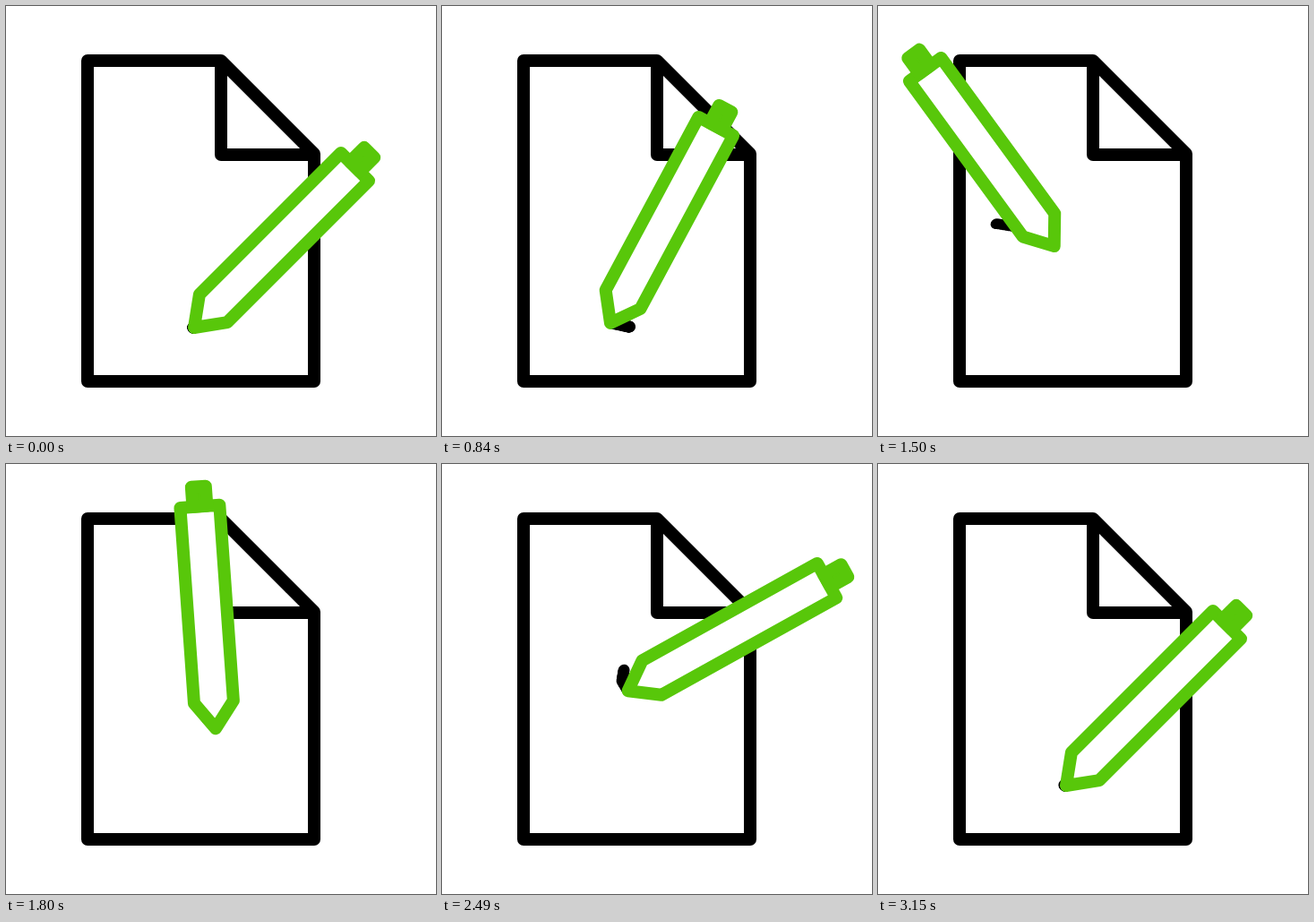
Recreate the animation shown at these times as an HTML page without scripts. Size 480 px wide and 480 px high, loop 3.18 s.

```html
<!DOCTYPE html>
<html lang="en">
<head>
<meta charset="utf-8">
<title>Writing pen</title>
<style>
  html, body { margin: 0; width: 100%; height: 100%; overflow: hidden; background: #fff; }
  svg { display: block; width: 100vw; height: 100vh; }
  path { stroke-width: 14; stroke-linecap: round; stroke-linejoin: round; }
  .page { fill: none; stroke: #000; }
  .pen path { fill: #fff; stroke: #58c70a; vector-effect: non-scaling-stroke; }
  .pen .cap { fill: #58c70a; }

  /* The ink is a chain of dots that follow the nib with growing delay. */
  .pen, .ink circle { animation: write 3180ms linear infinite; }
  .ink circle { r: 6.4px; animation-delay: calc(var(--i) * 9ms - 3180ms); }

  @keyframes write {
    0%, 18.87% { translate: 210px 359px; rotate: 45deg; scale: 1 1; }
    19.81% { translate: 211.5px 358px; rotate: 45deg; scale: 1 1; }
    23.58% { translate: 207px 358px; rotate: 39deg; scale: 1 .99; }
    27.04% { translate: 184px 353px; rotate: 26deg; scale: 1 .98; }
    29.56% { translate: 165px 341px; rotate: 15deg; scale: 1 .97; }
    32.08% { translate: 145.7px 317px; rotate: 2.2deg; scale: 1 .953; }
    35.85% { translate: 126px 279px; rotate: -16.5deg; scale: 1 .93; }
    38.99% { translate: 124px 257px; rotate: -23deg; scale: 1 .9; }
    42.14% { translate: 132px 243px; rotate: -26deg; scale: 1 .9; }
    44.03% { translate: 152px 246px; rotate: -30deg; scale: 1 .925; }
    47.17% { translate: 196.5px 268px; rotate: -36.2deg; scale: 1 .962; }
    50% { translate: 217px 279px; rotate: -32deg; scale: 1 .97; }
    52.83% { translate: 230px 288px; rotate: -21deg; scale: 1 .975; }
    57.55% { translate: 235px 297px; rotate: 0deg; scale: 1 .98; }
    60.69% { translate: 239px 298px; rotate: 17deg; scale: 1 .99; }
    62.58% { translate: 253px 304px; rotate: 27deg; scale: 1 1; }
    66.04% { translate: 237px 268.3px; rotate: 42.5deg; scale: 1 1; }
    69.81% { translate: 220px 240px; rotate: 52deg; scale: 1 1; }
    73.27% { translate: 203px 230px; rotate: 58deg; scale: 1 1; }
    75.79% { translate: 201px 242px; rotate: 60deg; scale: 1 1; }
    78.3% { translate: 207.5px 253px; rotate: 61deg; scale: 1 1; }
    82.39% { translate: 221px 286px; rotate: 60deg; scale: 1 1; }
    86.79% { translate: 229px 331px; rotate: 53deg; scale: 1 1; }
    89.31% { translate: 199px 350px; rotate: 49deg; scale: 1 1; }
    94.34% { translate: 208.5px 359px; rotate: 46deg; scale: 1 1; }
    99.06%, 100% { translate: 210px 359px; rotate: 45deg; scale: 1 1; }
  }
</style>
</head>
<body>
<svg viewBox="0 0 480 480">
  <path class="page" d="M91 61H240L344 165V419H91ZM240 61V166H344"/>
  <g class="ink">
    <circle style="--i:1"/><circle style="--i:2"/><circle style="--i:3"/>
    <circle style="--i:4"/><circle style="--i:5"/><circle style="--i:6"/>
    <circle style="--i:7"/><circle style="--i:8"/><circle style="--i:9"/>
    <circle style="--i:10"/><circle style="--i:11"/><circle style="--i:12"/>
    <circle style="--i:13"/><circle style="--i:14"/><circle style="--i:15"/>
    <circle style="--i:16"/><circle style="--i:17"/><circle style="--i:18"/>
  </g>
  <g class="pen">
    <path d="M0 0L-22 -30.4V-253.8H22V-30.4Z"/>
    <path class="cap" d="M-8 -254V-276.5H8V-254Z"/>
  </g>
</svg>
</body>
</html>
```
